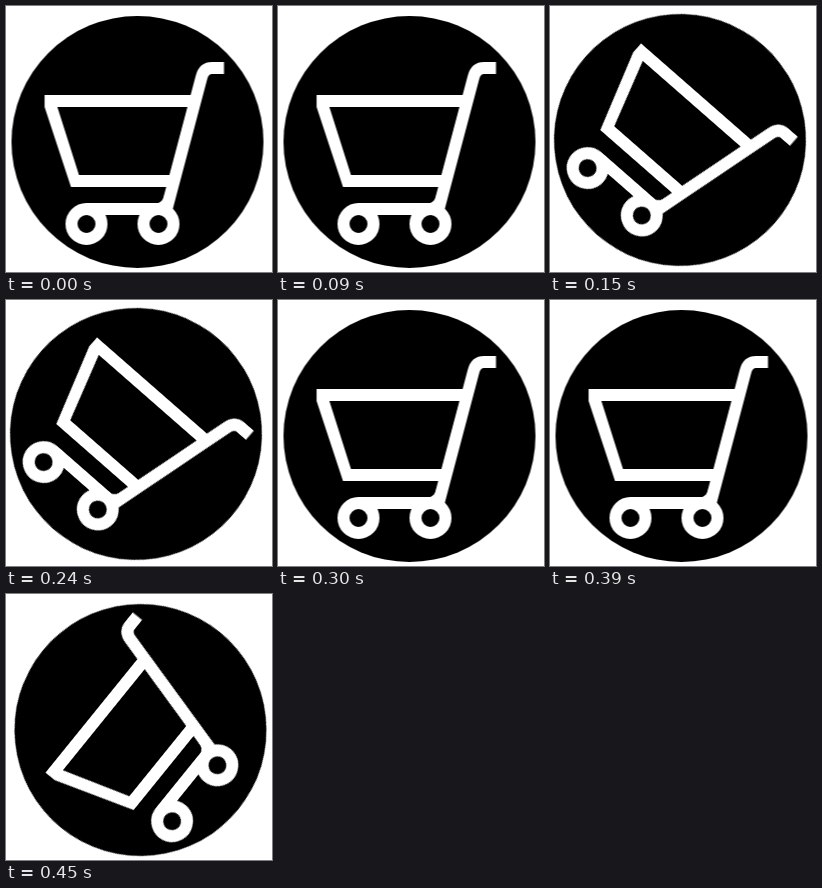
Write an HTML page that moves like this. It is 266 by 266 pixels and loops after 0.6 s.

```html
<!DOCTYPE html>
<html lang="en">
<head>
<meta charset="utf-8">
<title>Rocking cart</title>
<style>
  html, body { margin: 0; width: 100%; height: 100%; overflow: hidden; background: #fff; }
  svg { display: block; width: 100vw; height: 100vh; }
  .lines { fill: none; stroke: #fff; stroke-width: 12; }
  .solid { fill: #fff; fill-rule: evenodd; stroke: none; }
  .wheel { fill: #000; }
</style>
</head>
<body>
<svg viewBox="0 0 266 266">
  <!-- The badge is drawn around its own centre -->
  <g id="badge">
    <circle r="126"/>
    <g class="lines" transform="translate(-131.5 -136)">
      <path d="M218 62H206Q198 62 195.6 71L160.6 203H80"/>
      <path class="solid" d="M38.6 89H190L172 181H65L38.6 101ZM51.4 101L73 169H164L182 101Z"/>
      <path class="solid" d="M158.5 189Q156.5 197 150 197.5H160Z"/>
      <circle class="wheel" cx="80.5" cy="218" r="15"/>
      <circle class="wheel" cx="152.5" cy="218" r="15"/>
    </g>
  </g>
</svg>
<script>
  // Centre x, centre y, tilt in degrees
  const rest = [131.5, 136, 0];
  const poses = [rest, [130, 134, 41.2], rest, [134.5, 136, -51]];
  const hold = 150;

  const frames = [...poses, rest].map(([x, y, tilt], i) => ({
    transform: `translate(${x}px, ${y}px) rotate(${tilt}deg)`,
    offset: i / poses.length,
    easing: 'step-end'
  }));

  document.getElementById('badge').animate(frames, {
    duration: hold * poses.length,
    iterations: Infinity
  });
</script>
</body>
</html>
```
